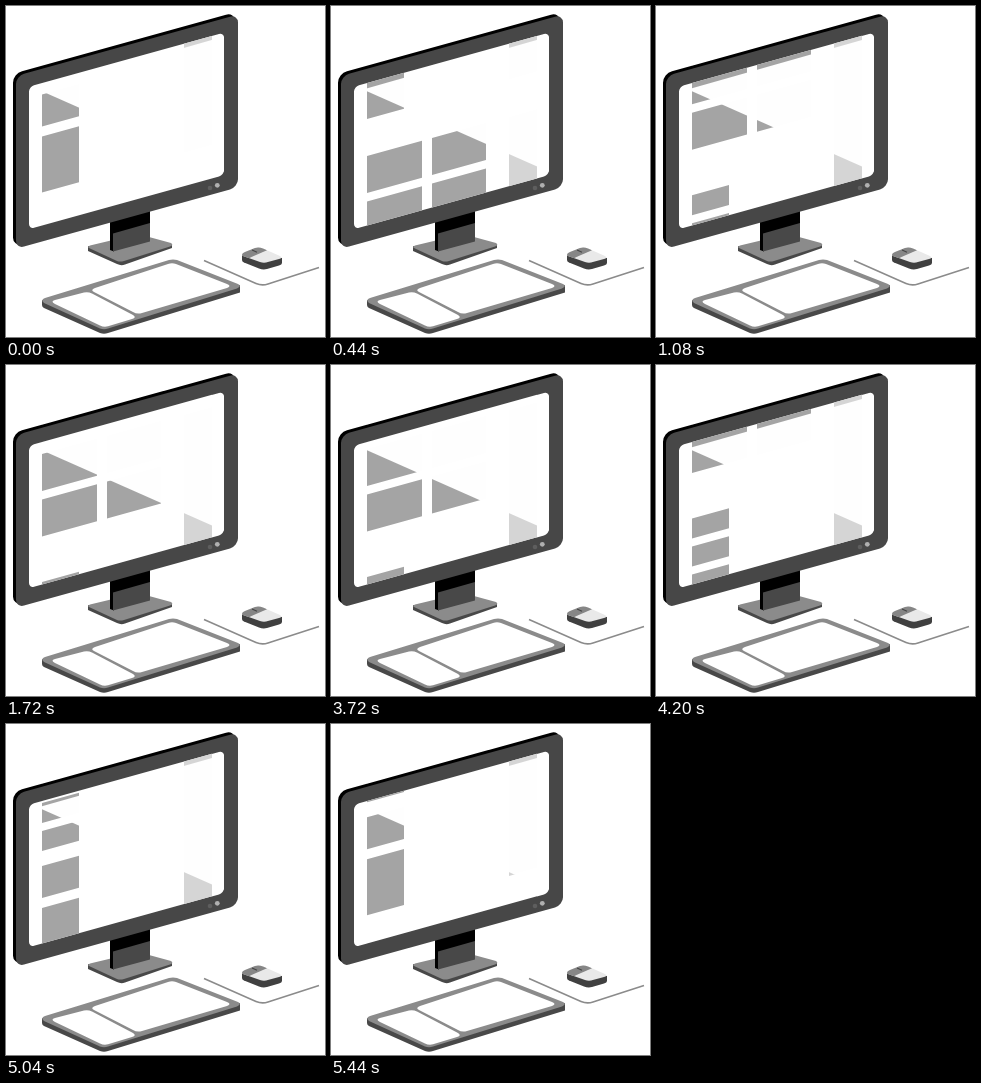
An HTML page for the animation above (5.48 s loop, 319 by 331 pixels).

```html
<!DOCTYPE html>
<html lang="en">
<head>
<meta charset="utf-8">
<title>Scrolling monitor</title>
<style>
  html, body { margin: 0; width: 100%; height: 100%; overflow: hidden; background: #fff; }
  svg { display: block; width: 319px; height: 331px; }
</style>
</head>
<body>
<svg viewBox="0 0 319 331">
  <defs>
    <clipPath id="screen"><rect x="13" y="14.2" width="195" height="142.5" rx="5"/></clipPath>
    <g id="page">
      <g fill="#a4a4a4">
        <path d="M26 0h55v37h-55zM91 0h54v37h-54z"/>
        <path d="M26 45.5h55v37h-55zM91 45.5h54v37h-54z"/>
        <path d="M26 128h37v20h-37zM26 156h37v20h-37zM26 184h37v20h-37z"/>
        <path d="M26 219h37v32h-37zM26 261h37v56h-37z"/>
      </g>
      <path d="M168 0h28v317h-28z" fill="#d5d5d5"/>
    </g>
  </defs>

  <!-- stand -->
  <path d="M82 240L115 254 166 238V242L119 258.500Q115 260 111 258L82 245Z" fill="#484848"/>
  <path d="M84 239.500L132 228 165 237Q168 239 164 240.500L118 255Q114 256 111 255L83 242Q81 241 84 239.500Z" fill="#8b8b8b"/>
  <path d="M104 205H108V245.500L104 244Z" fill="#000"/>
  <path d="M107 205H144V235.500L107 245.500Z" fill="#484848"/>
  <path d="M107 205H144V217L107 227.500Z" fill="#000"/>

  <!-- monitor -->
  <g transform="translate(7 67.7) skewY(-15.5)"><rect width="222" height="173" rx="9"/></g>
  <g transform="translate(10 70) skewY(-15.5)">
    <rect width="222" height="172.800" rx="8" fill="#474747"/>
    <rect x="13" y="14.2" width="195" height="142.5" rx="5" fill="#fff"/>
    <g clip-path="url(#screen)">
      <g id="scroll">
        <use href="#page"/>
        <use href="#page" y="354"/>
      </g>
    </g>
  </g>
  <path d="M32 83.500L218 30.500V165.800Z" fill="#fff" opacity=".99"/>
  <circle cx="204" cy="182" r="2.300" fill="#5e5e5e"/>
  <circle cx="211.300" cy="179.300" r="2.400" fill="#b0b0b0"/>

  <!-- keyboard -->
  <path d="M36 294L99 320 234 279V286.500L102 327Q98 328.500 94 327L38 302Q36 301 36 299Z" fill="#484848"/>
  <path d="M39 292L163 254Q167 253 171 254L232 278Q236 280 231 282.500L102 322.500Q98 324 94 322.500L38 297Q34 294 39 292Z" fill="#8b8b8b"/>
  <g fill="#fff">
    <path d="M49 294L78 286.500Q82 285.500 86 287.500L127 309Q131 311.500 126 313L102 320.300Q98 321.500 94 319.500L49 298Q44 295.500 49 294Z"/>
    <path d="M89 282L162 258Q166 256.500 170 258L221 278Q226 280 221 282L136 307Q131 308.500 127 306L88 286Q84 284 89 282Z"/>
  </g>

  <!-- mouse and mat -->
  <path d="M198 254.500L250 277.500Q256 280 262 278L313 261.500" fill="none" stroke="#8b8b8b" stroke-width="1.6"/>
  <path d="M236 248L276 252V257Q276 258.500 273 259.500L261 263Q257 264 253 262.500L238 256.500Q236 255.500 236 254Z" fill="#404040"/>
  <path d="M236 249Q236 247 239 246L249 242Q253 241 257 242.500L274 250Q277 252 273 253L260 256.500Q257 257 254 256L237 250Z" fill="#e9e9e9"/>
  <path d="M236 249Q236 247 239 246L249 242Q253 241 257 242.500L261 244.300 246 250.800 243 252.200 237 250Z" fill="#868686"/>
  <path d="M246 244L251 246.200" stroke="#444" stroke-width="1.2"/>
</svg>
<script>
  const STEP = 40, LOOP = 5480, REST_FROM = 1720, REST_TO = 3720;
  const PAGE_TOP = 26.2, PAGE_LENGTH = 354;
  const scroll = document.getElementById("scroll");

  // Steady scroll, then run past the page end and settle back.
  function offset(time) {
    if (time >= REST_TO) return 4.88 * (Math.floor((time - REST_TO) / STEP) + 1);
    if (time >= REST_FROM) return 0;
    const k = Math.floor(time / STEP);
    return 219.5 + 6.68 * k - 0.042 * k * (k - 11) - 0.0043 * k * (k - 11) * (k - 27);
  }

  function draw(now) {
    let y = PAGE_TOP - offset(now % LOOP);
    if (y < PAGE_TOP - PAGE_LENGTH) y += PAGE_LENGTH;
    scroll.setAttribute("transform", `translate(0 ${y.toFixed(2)})`);
    requestAnimationFrame(draw);
  }
  draw(0);
</script>
</body>
</html>
```
